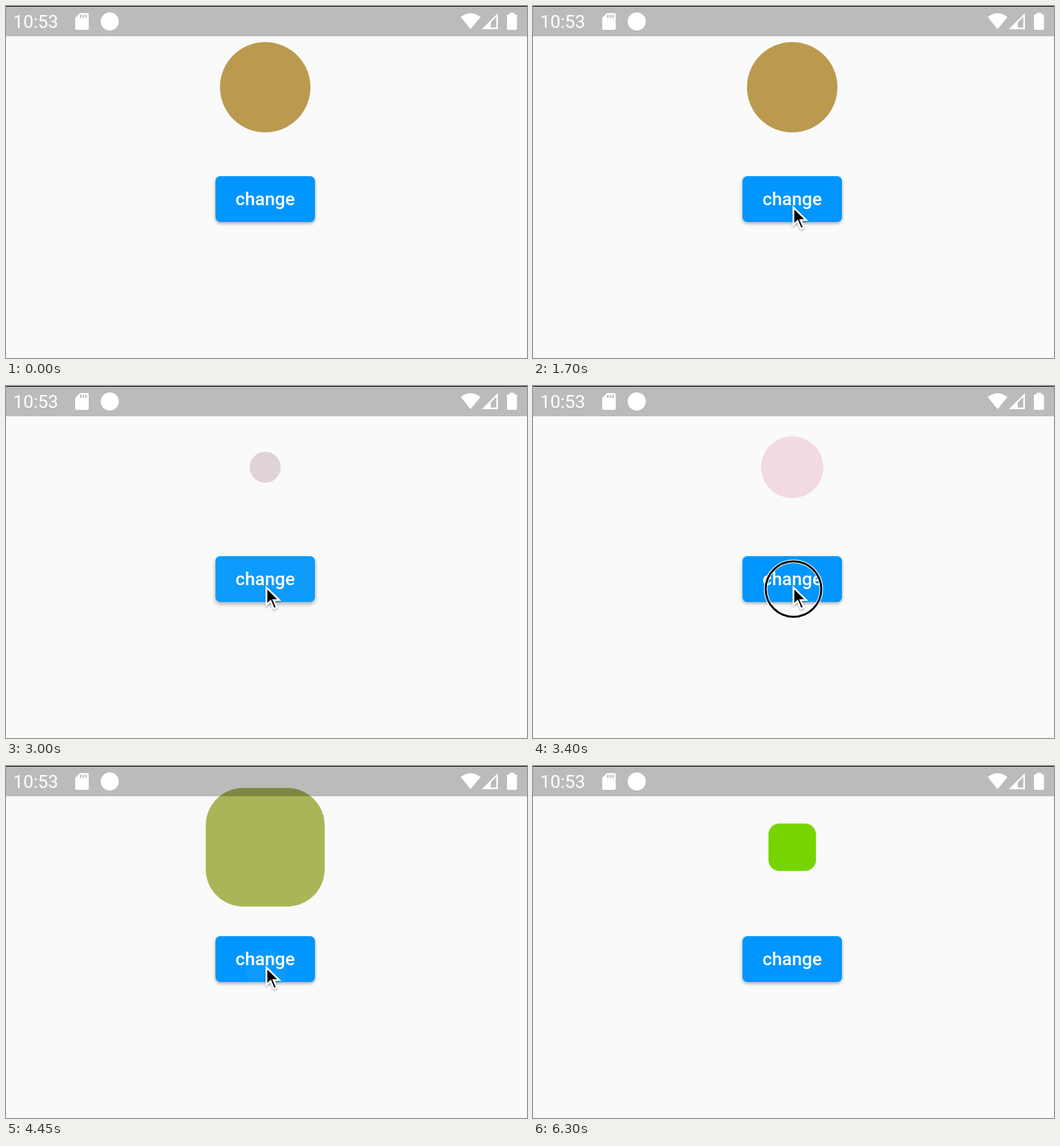
An HTML page with a canvas that plays this animation: 806x546 px, repeating every 6500 ms.

```html
<!DOCTYPE html>
<html lang="en">
<head>
<meta charset="utf-8">
<title>Animated container</title>
<style>
  html, body { margin: 0; width: 100%; height: 100%; overflow: hidden; background: #fafafa; }
  canvas { display: block; }
</style>
</head>
<body>
<canvas id="stage" width="806" height="546"></canvas>
<script>
const ctx = document.getElementById('stage').getContext('2d');
const LOOP = 6500, STEP = 50, DURATION = 485;
const CENTER = { x: 401, y: 126 };
const TOUCH = { x: 403, y: 315 };

// Resting shapes; each later one is reached by a move starting at `at`.
const shapes = [
  { size: 140, radius: 70, color: [187, 154, 79] },
  { at: 2043, size: 1.2, radius: 60, color: [205, 205, 200] },
  { at: 2768, size: 96, radius: 60, color: [242, 217, 226] },
  { at: 3892, size: 184, radius: 58, color: [171, 181, 87] },
  { at: 4565, size: 73.5, radius: 17, color: [118, 213, 0] }
];

// Button presses: slow ripple from `down`, fast spread and fade from `up`.
const taps = [
  { down: 2050, up: 2050 },
  { down: 2550, up: 2800, hold: true },
  { down: 3450, up: 3890 },
  { down: 4200, up: 4560 }
];
const rings = [1650, 3400, 4150];

// Cursor tip as [time, x, y]; each place is kept until the next one.
const trail = [
  [200, 540, 438], [950, 545, 323],
  [1150, 532, 330], [1200, 494, 336], [1250, 446, 328], [1300, 402, 308],
  [1350, 372, 297], [1400, 364, 300], [1450, 386, 307], [1500, 402, 310],
  [5350, 369, 362], [5750, 340, 440], [5800, 266, 509], [5850, 168, 470],
  [5900, 140, 330], [6000, 220, 107], [6200, 120, 42], [6250, 18, 4],
  [6300, -99, -99]
];

const lerp = (a, b, k) => a + (b - a) * k;
const clamp = (v, lo, hi) => Math.min(hi, Math.max(lo, v));
const bezier = (p1, p2, s) => 3 * p1 * s * (1 - s) ** 2 + 3 * p2 * s * s * (1 - s) + s ** 3;

function easeInOutBack(x) {
  if (x <= 0 || x >= 1) return clamp(x, 0, 1);
  let lo = 0, hi = 1;
  for (let i = 0; i < 24; i++) {
    const mid = (lo + hi) / 2;
    if (bezier(0.68, 0.265, mid) < x) lo = mid; else hi = mid;
  }
  return bezier(-0.55, 1.55, lo);
}

function polygon(points) {
  ctx.beginPath();
  points.forEach(([x, y]) => ctx.lineTo(x, y));
  ctx.closePath();
}

function disc(x, y, r) {
  ctx.beginPath();
  ctx.arc(x, y, r, 0, Math.PI * 2);
}

function roundBox(x, y, w, h, r) {
  ctx.beginPath();
  ctx.roundRect(x, y, w, h, r);
}

function setShadow(alpha, blur, dy) {
  ctx.shadowColor = `rgba(0,0,0,${alpha})`;
  ctx.shadowBlur = blur;
  ctx.shadowOffsetY = dy;
}

function drawShape(t) {
  let i = shapes.length - 1;
  while (i > 0 && t < shapes[i].at) i--;
  const to = shapes[i], from = shapes[i - 1] || to;
  const k = i ? easeInOutBack((t - to.at) / DURATION) : 1;
  let size = lerp(from.size, to.size, k);
  if (i === 1) size = Math.max(size, to.size);
  if (size <= 0) return;
  const rgb = to.color.map((c, n) => Math.round(clamp(lerp(from.color[n], c, k), 0, 255)));
  const radius = clamp(lerp(from.radius, to.radius, k), 0, size / 2);
  ctx.fillStyle = `rgb(${rgb})`;
  roundBox(CENTER.x - size / 2, CENTER.y - size / 2, size, size, radius);
  ctx.fill();
}

function drawStatusBar() {
  ctx.fillStyle = 'rgba(0,0,0,0.255)';
  ctx.fillRect(0, 0, 806, 47);
  ctx.fillStyle = '#000';
  ctx.fillRect(0, 0, 806, 1);

  ctx.fillStyle = '#fff';
  ctx.font = '400 28px Roboto, sans-serif';
  ctx.textAlign = 'left';
  ctx.fillText('10:53', 11, 34);

  // memory card
  ctx.beginPath();
  ctx.moveTo(114.5, 11);
  ctx.lineTo(125.5, 11);
  ctx.quadraticCurveTo(128, 11, 128, 13.5);
  ctx.lineTo(128, 34.5);
  ctx.quadraticCurveTo(128, 37, 125.5, 37);
  ctx.lineTo(109.5, 37);
  ctx.quadraticCurveTo(107, 37, 107, 34.5);
  ctx.lineTo(107, 18.5);
  ctx.fill();
  ctx.fillStyle = '#bababa';
  for (let i = 0; i < 3; i++) ctx.fillRect(114.5 + i * 4, 13.5, 2.2, 5);

  ctx.fillStyle = '#fff';
  disc(160.5, 24, 14);
  ctx.fill();

  // wifi
  ctx.beginPath();
  ctx.moveTo(718.7, 36);
  ctx.lineTo(703.5, 17);
  ctx.quadraticCurveTo(718.7, 5.5, 734, 17);
  ctx.fill();

  // mobile signal
  polygon([[736, 36], [761, 11], [761, 36]]);
  ctx.fill();
  ctx.fillStyle = '#bababa';
  polygon([[750, 25.5], [758.5, 17], [758.5, 33.5], [750, 33.5]]);
  ctx.fill();

  // battery
  ctx.fillStyle = '#fff';
  roundBox(775, 13, 15.5, 24, 2);
  ctx.fill();
  ctx.fillRect(779, 10.5, 7.5, 4);
}

function drawRipple(tap, t) {
  if (t < tap.down) return;
  const age = (tap.hold ? 0 : Math.min(t, tap.up) - tap.down);
  const spread = clamp((t - tap.up) / 200, 0, 1);
  const fade = 1 - clamp((t - tap.up - 50) / 250, 0, 1);
  if (!fade) return;
  ctx.fillStyle = `rgba(200,215,225,${lerp(0.06, 0.16, spread) * fade})`;
  disc(TOUCH.x, TOUCH.y + 2, lerp(20 + age * 0.05, 90, spread));
  ctx.fill();
}

function drawButton(t) {
  const lift = Math.max(0, ...taps.slice(1).map(
    tap => 1 - Math.abs(t - tap.up - 100) / 150));
  ctx.save();
  setShadow(0.32, 5 + 5 * lift, 2.5 + 2 * lift);
  ctx.fillStyle = '#0096ff';
  roundBox(324, 264, 154, 71, 7.5);
  ctx.fill();
  ctx.restore();

  ctx.save();
  roundBox(324, 264, 154, 71, 7.5);
  ctx.clip();
  taps.forEach(tap => drawRipple(tap, t));
  ctx.restore();

  ctx.fillStyle = '#fff';
  ctx.font = '500 28px Roboto, sans-serif';
  ctx.textAlign = 'center';
  ctx.fillText('change', 401, 309);
}

function drawRing(t) {
  if (!rings.some(at => t >= at && t < at + STEP)) return;
  disc(TOUCH.x, TOUCH.y, 43);
  ctx.strokeStyle = 'rgba(255,255,255,0.85)';
  ctx.lineWidth = 5.6;
  ctx.stroke();
  ctx.strokeStyle = '#000';
  ctx.lineWidth = 3;
  ctx.stroke();
}

function drawCursor(t) {
  const place = trail.filter(p => p[0] <= t).pop();
  if (!place) return;
  ctx.save();
  ctx.translate(place[1], place[2]);
  polygon([[1, 2.6], [1, 29.5], [7.3, 23.6], [12.3, 35.5], [16.8, 33.6], [11.8, 22], [20.6, 22]]);
  ctx.lineWidth = 2.6;
  ctx.strokeStyle = '#fff';
  ctx.save();
  setShadow(0.35, 3, 1.5);
  ctx.stroke();
  ctx.restore();
  ctx.fillStyle = '#000';
  ctx.fill();
  ctx.stroke();
  ctx.restore();
}

function draw(t) {
  ctx.fillStyle = '#fafafa';
  ctx.fillRect(0, 0, 806, 546);
  drawShape(t);
  drawStatusBar();
  drawButton(t);
  drawRing(t);
  drawCursor(t);
}

const start = performance.now();
function tick() {
  const t = (performance.now() - start) % LOOP;
  draw(Math.floor(t / STEP) * STEP);
  requestAnimationFrame(tick);
}
tick();
</script>
</body>
</html>
```
